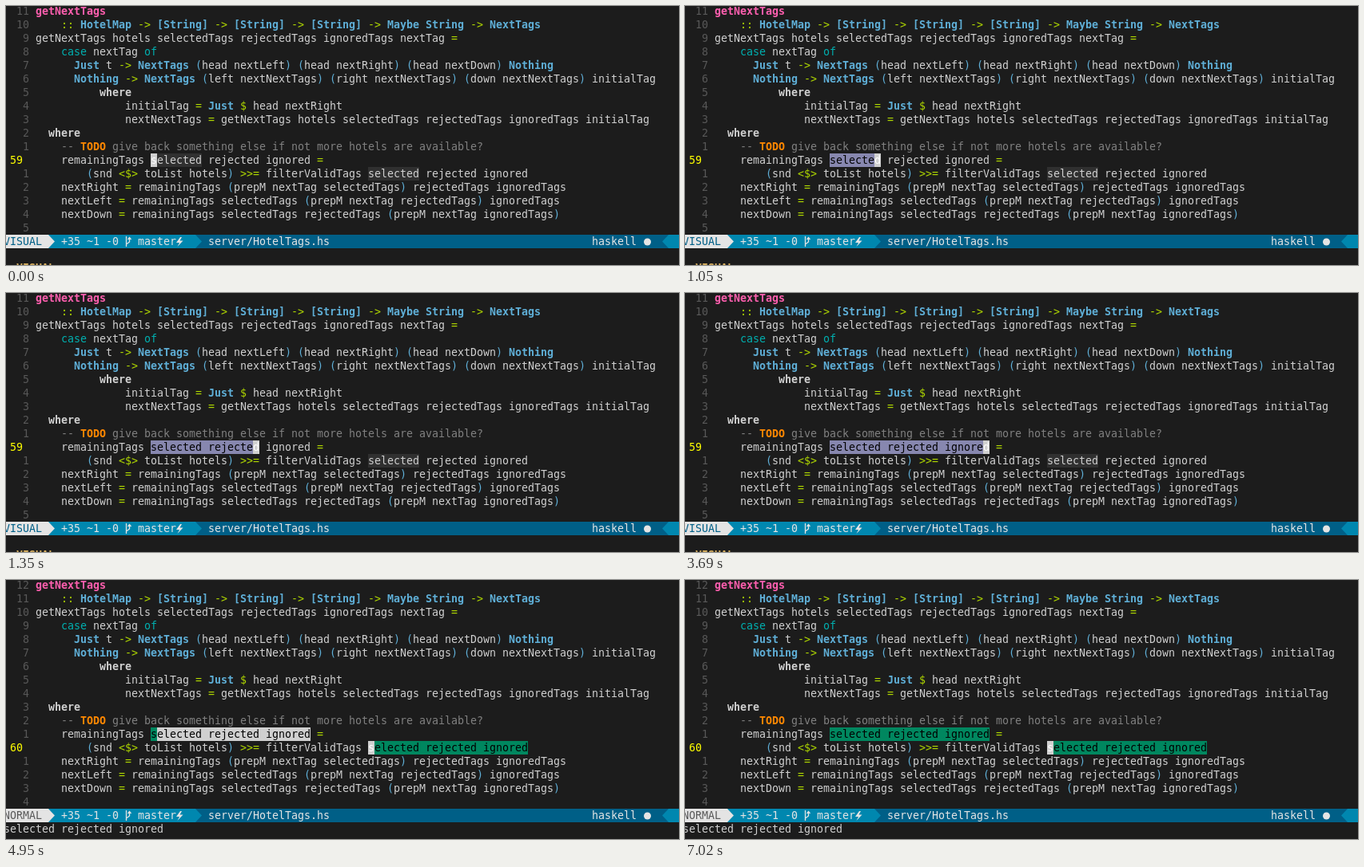
An HTML page with a canvas that plays this animation: 842x325 px, repeating every 8000 ms.

```html
<!DOCTYPE html>
<html lang="en">
<head>
<meta charset="utf-8">
<title>Editor selection and search</title>
<style>
  html, body { margin: 0; width: 100%; height: 100%; overflow: hidden; background: #1c1c1c; }
  canvas { display: block; }
</style>
</head>
<body>
<canvas id="stage" width="842" height="325"></canvas>
<script>
const ctx = document.getElementById('stage').getContext('2d');

// Terminal grid
const CELL = 8, LINE = 17, LEFT = -3, TOP = -2, BASELINE = 13, GUTTER = 5;
const FONT = '13.29px "DejaVu Sans Mono", monospace';
const STATUS_ROW = 17, MESSAGE_ROW = 18;

const COLOR = {
  bg: '#1c1c1c', text: '#d0d0d0', number: '#585858', current: '#ffff00',
  match: '#303030', visual: '#8787af', search: '#00875f', cursor: '#d0d0d0',
  light: '#e4e4e4', blue: '#0087af', deep: '#005f87'
};

const code = `getNextTags
    :: HotelMap -> [String] -> [String] -> [String] -> Maybe String -> NextTags
getNextTags hotels selectedTags rejectedTags ignoredTags nextTag =
    case nextTag of
      Just t -> NextTags (head nextLeft) (head nextRight) (head nextDown) Nothing
      Nothing -> NextTags (left nextNextTags) (right nextNextTags) (down nextNextTags) initialTag
          where
              initialTag = Just $ head nextRight
              nextNextTags = getNextTags hotels selectedTags rejectedTags ignoredTags initialTag
  where
    -- TODO give back something else if not more hotels are available?
    remainingTags selected rejected ignored =
        (snd <$> toList hotels) >>= filterValidTags selected rejected ignored
    nextRight = remainingTags (prepM nextTag selectedTags) rejectedTags ignoredTags
    nextLeft = remainingTags selectedTags (prepM nextTag rejectedTags) ignoredTags
    nextDown = remainingTags selectedTags rejectedTags (prepM nextTag ignoredTags)
`.split('\n');

// Token pattern, colour, bold
const RULES = [
  [/^--$/, '#808080'],
  [/^[A-Z]/, '#5fafd7', true],
  [/^[\[\]]$/, '#5fafd7', true],
  [/^[()]$/, '#5fafd7'],
  [/^[-:=$<>]+$/, '#afd700'],
  [/^(case|of)$/, '#00afaf'],
  [/^where$/, COLOR.text, true]
];

const ARGS = 'selected rejected ignored';
const DEF = { row: 11, col: code[11].indexOf(ARGS) };
const USE = { row: 12, col: code[12].indexOf(ARGS) };

function rect(x, y, w, h, color) {
  ctx.fillStyle = color;
  ctx.fillRect(x, y, w, h);
}

function polygon(color, ...points) {
  ctx.fillStyle = color;
  ctx.beginPath();
  points.forEach(([x, y]) => ctx.lineTo(x, y));
  ctx.fill();
}

function write(row, col, text, color, bold = false) {
  ctx.font = (bold ? 'bold ' : '') + FONT;
  ctx.fillStyle = color;
  ctx.fillText(text, LEFT + col * CELL, TOP + row * LINE + BASELINE);
}

function styleOf(token, row) {
  if (row === 0) return ['#ff5faf', true];
  if (row === 10) return token === 'TODO' ? ['#ff8700', true] : ['#808080'];
  const rule = RULES.find(([pattern]) => pattern.test(token));
  return rule ? rule.slice(1) : [COLOR.text];
}

function drawCode(currentRow) {
  code.forEach((line, row) => {
    if (row === currentRow) write(row, 1, String(48 + row), COLOR.current);
    else write(row, 0, String(Math.abs(row - currentRow)).padStart(4), COLOR.number);
    for (const { 0: token, index } of line.matchAll(/\w+|[()[\]]|[^\w\s()[\]]+/g))
      write(row, GUTTER + index, token, ...styleOf(token, row));
  });
}

// Repaints characters from..to of the argument list at a place
function mark(place, from, to, bg, fg) {
  const col = GUTTER + place.col + from;
  rect(LEFT + col * CELL, TOP + place.row * LINE, (to - from) * CELL, LINE, bg);
  write(place.row, col, ARGS.slice(from, to), fg);
}

const cursor = (place, at) => mark(place, at, at + 1, COLOR.cursor, '#ffffff');

function drawStatus(mode) {
  const y = TOP + STATUS_ROW * LINE, mid = y + LINE / 2, end = y + LINE;
  rect(0, y, 842, LINE, COLOR.deep);
  rect(0, y, 237, LINE, COLOR.blue);
  rect(0, y, 53, LINE, COLOR.light);
  rect(829, y, 13, LINE, COLOR.blue);
  polygon(COLOR.light, [53, y], [61, mid], [53, end]);
  polygon(COLOR.blue, [237, y], [245, mid], [237, end]);
  polygon(COLOR.blue, [829, y], [821, mid], [829, end]);

  write(STATUS_ROW, 0, mode, mode === 'VISUAL' ? COLOR.deep : COLOR.number);
  write(STATUS_ROW, 9, '+35 ~1 -0', COLOR.light);
  write(STATUS_ROW, 21, 'master', COLOR.light);
  write(STATUS_ROW, 32, 'server/HotelTags.hs', COLOR.light);
  write(STATUS_ROW, 92, 'haskell', COLOR.light);

  // Branch, lightning and file type symbols
  ctx.strokeStyle = COLOR.light;
  ctx.lineWidth = 1.3;
  ctx.stroke(new Path2D('M150.5 289V302M150.5 299L154.5 296V291M152.5 293L154.5 290.5L156.5 293'));
  polygon(COLOR.light, [218, 290], [213, 297], [217, 297], [214.5, 302],
    [221.5, 294.5], [217.5, 294.5], [220, 290]);
  ctx.fillStyle = COLOR.light;
  ctx.beginPath();
  ctx.arc(802.5, 296, 4.5, 0, Math.PI * 2);
  ctx.fill();
}

function drawVisual(time) {
  drawCode(DEF.row);
  mark(USE, 0, 8, COLOR.match, COLOR.text);
  if (time < 600) {
    mark(DEF, 0, 8, COLOR.match, COLOR.text);
    cursor(DEF, 0);
  } else {
    const last = time < 1350 ? 7 : time < 1800 ? 16 : 24;
    mark(DEF, 0, last, COLOR.visual, '#000000');
    cursor(DEF, last);
  }
  drawStatus('VISUAL');
  ctx.font = 'bold ' + FONT;
  ctx.fillStyle = '#d7af5f';
  ctx.fillText('VISUAL', 13, 333);
}

function drawSearch(time) {
  drawCode(USE.row);
  mark(DEF, 0, 25, COLOR.search, '#000000');
  if (time < 5550) mark(DEF, 1, 25, COLOR.cursor, '#000000');
  mark(USE, 0, 25, COLOR.search, '#000000');
  cursor(USE, 0);
  drawStatus('NORMAL');
  write(MESSAGE_ROW, 0, ARGS, COLOR.text);
}

function frame() {
  const time = performance.now() % 8000;
  rect(0, 0, 842, 325, COLOR.bg);
  (time < 4950 ? drawVisual : drawSearch)(time);
  requestAnimationFrame(frame);
}
frame();
</script>
</body>
</html>
```
